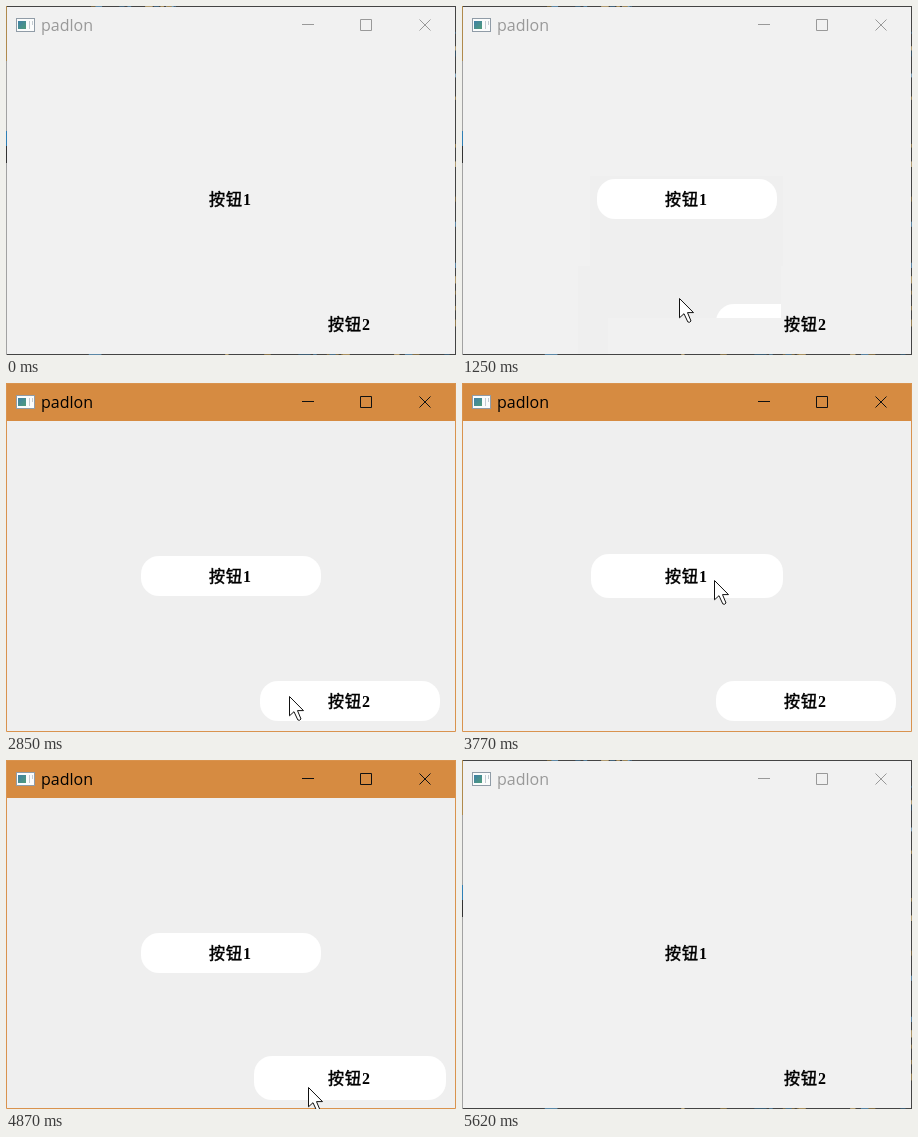
These frames come from a looping animation (450x349 px, 5680 ms). An HTML page:

```html
<!DOCTYPE html>
<html lang="zh">
<head>
<meta charset="utf-8">
<title>Buttons</title>
<style>
html, body { margin: 0; width: 100%; height: 100%; overflow: hidden; }
svg { display: block; width: 450px; height: 349px; }
.title { font: 16px "Open Sans", "Noto Sans", sans-serif; }
.label { font: 16px "Noto Sans CJK SC", "Noto Sans CJK", sans-serif; letter-spacing: 1px; stroke: #000; stroke-width: .5px; }
.label tspan { font: 700 16px "Liberation Serif", serif; letter-spacing: 0; stroke: none; }
</style>
</head>
<body>
<svg viewBox="0 0 450 349" xmlns="http://www.w3.org/2000/svg">
  <defs>
    <linearGradient id="teal" x2="1" y2="1">
      <stop stop-color="#3f80a8"/><stop offset="1" stop-color="#4f9c7a"/>
    </linearGradient>
    <clipPath id="part"><rect id="partBox"/></clipPath>
  </defs>

  <rect id="back" width="450" height="349"/>
  <g id="patches" fill="#efefef">
    <rect data-from="190" x="116" y="260" width="30" height="89"/>
    <rect data-from="370" x="128" y="170" width="193" height="90"/>
    <rect data-from="990" x="128" y="260" width="191" height="52"/>
  </g>

  <g id="idle">
    <path d="M0 .5H450M449.5 0V349M0 348.5H450" stroke="#444"/>
    <path d="M.5 0V349" stroke="#a2a2a2"/>
    <path d="M.5 0V55" stroke="#b08a4c"/>
    <path d="M.5 125V140" stroke="#2f7fb5"/>
    <path d="M.5 140V157" stroke="#333"/>
  </g>
  <g id="active">
    <rect width="450" height="38" fill="#d68b41"/>
    <path d="M.5 .5H449.5V348.5H.5Z" fill="none" stroke="#d9934e"/>
  </g>

  <rect x="10.5" y="12.5" width="18" height="13" fill="#fbfcfc" stroke="#909ca7"/>
  <rect x="12" y="15" width="8" height="8" fill="url(#teal)"/>
  <path d="M23.5 15V23M26.5 15V19" stroke="#c3cbd1"/>
  <text id="title" class="title" x="35" y="25">padlon</text>
  <path id="controls" fill="none" d="M296 18.5H308M354.5 13.5H365.5V24.5H354.5ZM413.5 13.5L424.5 24.5M424.5 13.5L413.5 24.5"/>

  <rect id="b1" rx="18" fill="#fff"/>
  <g clip-path="url(#part)"><rect id="b2" rx="18" fill="#fff"/></g>
  <circle id="press" cx="303.5" cy="306.5" r="12" fill="#a8f87d"/>
  <text class="label" x="203" y="199">按钮<tspan>1</tspan></text>
  <text class="label" x="322" y="324">按钮<tspan>2</tspan></text>
  <path id="cursor" d="M.5 .5V19.8L5 15.7L8.8 23.9Q10.4 25.2 12 23L8.5 14.6H14.5Z" fill="#fff" stroke="#111"/>
</svg>

<script>
const LOOP = 5680, FRAME = 60, FADE = 180;
const $ = id => document.getElementById(id);

// Each stroke runs on from the one before; bend bows it sideways.
const strokes = [
  { from: 130, to: 550, end: [213, 195], bend: [-5, -45] },
  { from: 810, to: 990, end: [192, 287], bend: [6, 0] },
  { from: 1250, to: 1490, end: [303, 306], bend: [25, 6] },
  { from: 2850, to: 3030, end: [170, 322], bend: [7, 8] },
  { from: 3280, to: 3520, end: [255, 178], bend: [0, 0] },
  { from: 3770, to: 4320, end: [249, 189], bend: [-16, 106] },
  { from: 4440, to: 4620, end: [307, 336], bend: [0, 0] },
  { from: 4870, to: 5290, end: [170, 352], bend: [22, -42] }
];

// Times at which the pointer enters and leaves each button.
const hover1 = [[370, 870], [3460, 3880], [4190, 4440]];
const hover2 = [[1310, 1847], [4560, 4990]];

const clamp = v => Math.min(1, Math.max(0, v));

function pointer(t) {
  let at = [110, 352];
  for (const { from, to, end, bend } of strokes) {
    if (t < from) break;
    const done = Math.floor((t - from) / FRAME) * FRAME + FRAME;
    const u = clamp(done / (to - from + FRAME)) ** 1.25;
    const bow = Math.sin(Math.PI * u);
    at = at.map((v, i) => v + (end[i] - v) * u + bend[i] * bow);
  }
  return at.map(Math.round);
}

function growth(spans, t) {
  return Math.max(...spans.map(([enter, leave]) =>
    Math.min(clamp((t - enter) / FADE), clamp(1 - (t - leave) / FADE))));
}

function set(el, values) {
  for (const k in values) el.setAttribute(k, values[k]);
}

function show(el, on) { set(el, { visibility: on ? "visible" : "hidden" }); }

function size(el, x, y, g) {
  set(el, { x: x - 6 * g, y: y - 2 * g, width: 180 + 12 * g, height: 40 + 4 * g });
}

// Flecks of the desktop showing along the window edge.
function addFlecks() {
  let seed = 7;
  const rand = () => (seed = seed * 16807 % 2147483647) / 2147483647;
  const fleck = (x, y, w, h, fill) => {
    const r = document.createElementNS("http://www.w3.org/2000/svg", "rect");
    set(r, { x, y, width: w, height: h, fill });
    $("idle").append(r);
  };
  const tone = () => `hsl(${rand() < .5 ? 40 : 205} 30% ${30 + rand() * 30}%)`;
  for (let i = 0; i < 14; i++) {
    fleck(85 + rand() * 85, 0, 2 + rand() * 6, 1, tone());
    fleck(rand() * 440, 348, 3 + rand() * 10, 1, tone());
    fleck(449, rand() * 340, 1, 2 + rand() * 6, tone());
  }
}

function draw(t) {
  const on = t >= 1820 && t < 5620, ended = t >= 5620;
  set($("back"), { fill: on ? "#efefef" : "#f1f1f1" });
  show($("active"), on);
  show($("idle"), !on);
  for (const r of $("patches").children) show(r, !on && !ended && t >= +r.dataset.from);
  set($("title"), { fill: on ? "#000" : "#999" });
  set($("controls"), { stroke: on ? "#111" : "#999" });

  // The shrinking of button 2 pauses while it is pressed.
  const pressed = t >= 1880 && t < 2460;
  show($("press"), pressed);
  show($("b1"), t >= 370 && !ended);
  show($("b2"), t >= 990 && !ended);
  size($("b1"), 135, 173, growth(hover1, t));
  size($("b2"), 254, 298, growth(hover2, pressed ? 1880 : t));
  const full = t >= 1310;
  set($("partBox"), { width: full ? 450 : 319, height: full ? 349 : 312 });

  set($("cursor"), { transform: `translate(${pointer(t)})` });
}

function tick() {
  draw(performance.now() % LOOP);
  requestAnimationFrame(tick);
}
addFlecks();
tick();
</script>
</body>
</html>
```
